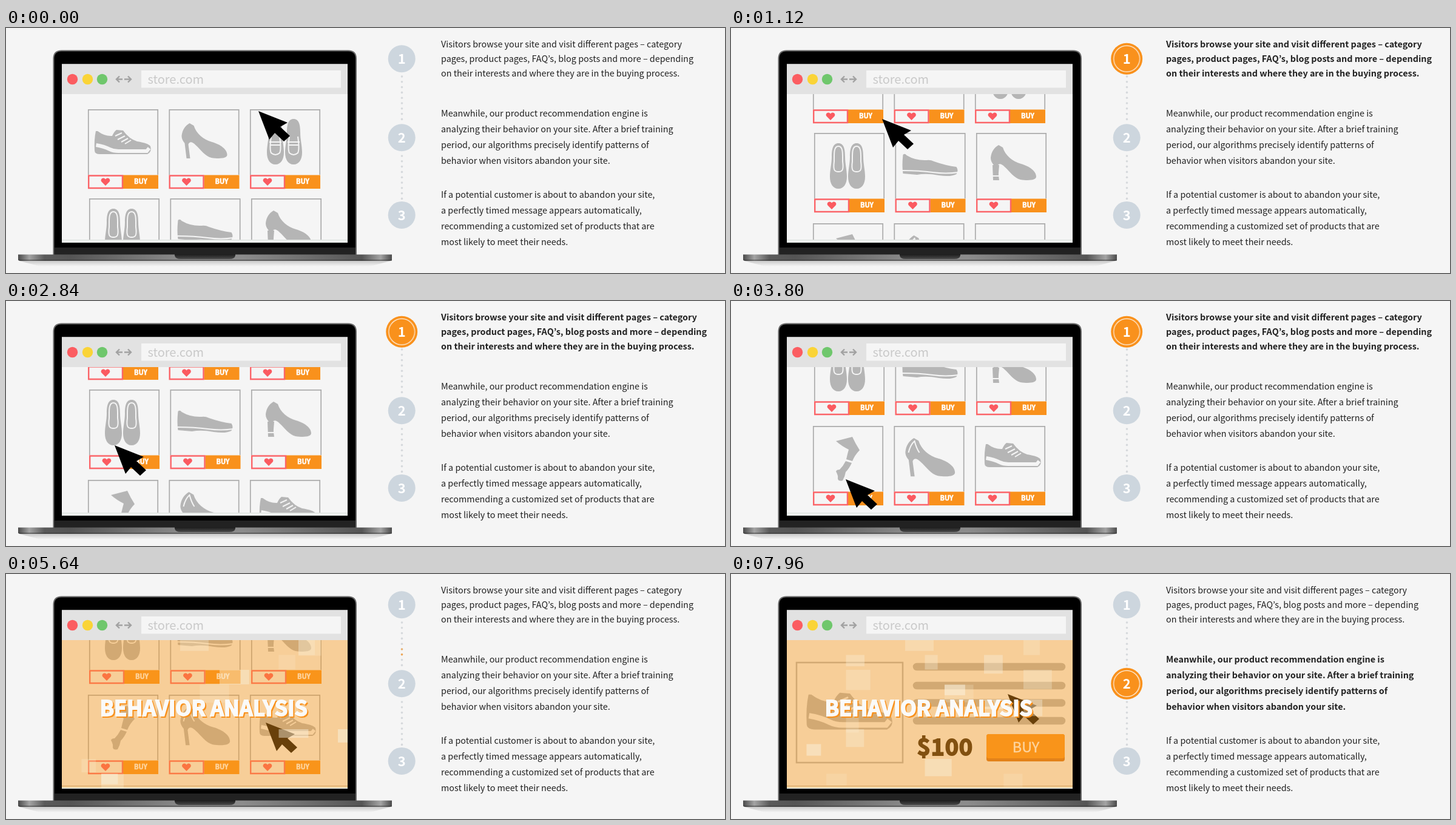
Animation of 1185 by 404 pixels, one loop 8000 ms. Source, as an HTML page:

```html
<!DOCTYPE html>
<html lang="en">
<head>
<meta charset="utf-8">
<title>Behavior analysis</title>
<style>
html, body { margin: 0; width: 100%; height: 100%; overflow: hidden; background: #f5f5f5; }
svg { display: block; width: 1185px; height: 404px; }
text { font-family: "Noto Sans CJK KR", "Noto Sans CJK JP", "Noto Sans CJK SC", "Noto Sans CJK", "Noto Sans", sans-serif; white-space: pre; }
.copy { font-size: 14.37px; fill: #222; }
.bold { font-weight: 700; }
.mid { text-anchor: middle; }
.cut { fill: none; stroke: #f5f5f5; stroke-width: 2; }
.sole { stroke-width: 6; }

.scroll, .cursor, .grid, .detail, .overlay, .anim { animation: 8s linear infinite; }
.scroll { animation-name: scroll; }
.cursor { animation-name: cursor; animation-timing-function: ease-in-out; }
.grid { animation-name: leave; }
.detail { animation-name: enter; }
.overlay { animation-name: overlay; }
.disc { transform-box: fill-box; transform-origin: center; }
.ring { fill: none; stroke: #fff; stroke-width: 1.1; stroke-dasharray: 100 100; }
.plain1 { animation-name: plain1; }
.bold1 { animation-name: bold1; }
.plain2 { animation-name: plain2; }
.bold2 { animation-name: bold2; }
.disc1 { animation-name: disc1; }
.disc2 { animation-name: disc2; }
.ring1 { animation-name: ring1; }
.ring2 { animation-name: ring2; }
.pulse { opacity: 0; animation-name: pulse; }
.block { opacity: 0; animation: blink infinite; }

@keyframes scroll {
  0% { transform: translateY(0); animation-timing-function: ease-in-out; }
  14%, 27.5% { transform: translateY(-108px); animation-timing-function: ease-in; }
  35.5% { transform: translateY(-135px); }
  47.5% { transform: translateY(-224px); animation-timing-function: ease-out; }
  50%, 100% { transform: translateY(-231px); }
}
@keyframes cursor {
  0% { transform: translate(416px, 137px); }
  14%, 18% { transform: translate(249px, 150px); }
  35.5% { transform: translate(179px, 238px); }
  47.5%, 49.5% { transform: translate(189px, 294px); }
  64%, 74% { transform: translate(428px, 245px); }
  87.5% { transform: translate(446px, 242px); }
  99.5%, 100% { transform: translate(456px, 198px); }
}
@keyframes leave { 0%, 77.9% { opacity: 1; } 78%, 100% { opacity: 0; } }
@keyframes enter { 0%, 77.9% { opacity: 0; } 78%, 100% { opacity: 1; } }
@keyframes overlay { 0%, 49.5% { opacity: 0; } 55%, 100% { opacity: 1; } }
@keyframes plain1 { 0%, 1.2% { opacity: 1; } 1.25%, 62.4% { opacity: 0; } 62.5%, 100% { opacity: 1; } }
@keyframes bold1 { 0%, 1.2% { opacity: 0; } 1.25%, 62.4% { opacity: 1; } 62.5%, 100% { opacity: 0; } }
@keyframes plain2 { 0%, 76.4% { opacity: 1; } 76.5%, 100% { opacity: 0; } }
@keyframes bold2 { 0%, 76.4% { opacity: 0; } 76.5%, 100% { opacity: 1; } }
@keyframes disc1 {
  0%, .4% { opacity: 0; transform: scale(.85); }
  2.5%, 62% { opacity: 1; transform: none; }
  64.5%, 100% { opacity: 0; transform: scale(.85); }
}
@keyframes disc2 {
  0%, 75.8% { opacity: 0; transform: scale(.85); }
  78%, 100% { opacity: 1; transform: none; }
}
@keyframes ring1 {
  0%, 1.4% { stroke-dashoffset: 100; transform: rotate(-90deg); }
  13.8%, 50.9% { stroke-dashoffset: 0; transform: rotate(-90deg); }
  51% { stroke-dashoffset: 0; transform: none; }
  62%, 100% { stroke-dashoffset: -100; transform: none; }
}
@keyframes ring2 {
  0%, 77.5% { stroke-dashoffset: 100; transform: rotate(-90deg); }
  90.5%, 100% { stroke-dashoffset: 0; transform: rotate(-90deg); }
}
@keyframes pulse { 0% { opacity: 0; } 1.1% { opacity: 1; } 2.6%, 100% { opacity: 0; } }
@keyframes blink { 0%, 30% { opacity: 1; } 30.1%, 100% { opacity: 0; } }
</style>
</head>
<body>
<svg viewBox="0 0 1185 404">
  <defs>
    <linearGradient id="metal">
      <stop offset="0" stop-color="#4a4a4a"/><stop offset=".03" stop-color="#a4a4a4"/>
      <stop offset=".07" stop-color="#5a5a5a"/><stop offset=".14" stop-color="#555"/>
      <stop offset=".45" stop-color="#8c8c8c"/><stop offset=".6" stop-color="#8c8c8c"/>
      <stop offset=".92" stop-color="#555"/><stop offset=".97" stop-color="#a4a4a4"/>
      <stop offset="1" stop-color="#4a4a4a"/>
    </linearGradient>
    <linearGradient id="shade" x2="0" y2="1">
      <stop offset="0" stop-color="#c8c8c8"/><stop offset="1" stop-color="#f5f5f5"/>
    </linearGradient>
    <linearGradient id="notch" x2="0" y2="1">
      <stop offset="0" stop-color="#1c1c1c"/><stop offset="1" stop-color="#4a4a4a"/>
    </linearGradient>
    <clipPath id="page"><path d="M92 109H563V349H92Z"/></clipPath>
    <clipPath id="screen"><path d="M92 109H563V354H92Z"/></clipPath>

    <g id="sneaker">
      <path d="M13 36L16 36Q28 45 40 44Q43 37 47 34L58 35Q68 49 81 53Q100 56 103 61Q106 70 98 74H20Q11 74 11 68Q10 50 13 36Z"/>
      <path class="cut sole" d="M13.500 59Q26 61 36 66Q42 69 50 69H97L101 64"/>
      <path class="cut" d="M45 44L56 39M49 50L61 44M55 54L66 48M61 57L71 51"/>
    </g>
    <g id="heel">
      <path d="M21 44C22 34 27 27 34 23L41 27C45 40 57 50 71 54C85 58 96 66 96 75C96 81 84 82 70 80C60 78 52 66 44 59C38 53 34 53 32 58L35 81H29L26 56C23 52 21 49 21 44Z"/>
    </g>
    <g id="block-heel">
      <use href="#heel" transform="translate(3 -3)"/>
      <path d="M27 53H38L36 78H28Z"/>
      <path class="cut" d="M27 71H38"/>
    </g>
    <g id="open-heel">
      <use href="#heel" transform="translate(-4 -5) scale(1.09)"/>
      <path class="cut" d="M24 44Q27 31 34 25Q37 37 42 44"/>
    </g>
    <path id="footprint" d="M14 0C23 0 25 10 25 22C25 34 28 44 28 55C28 67 23 75 14 75C5 75 0 67 0 55C0 44 3 34 3 22C3 10 5 0 14 0Z"/>
    <g id="moccasins">
      <g id="moccasin" transform="translate(28 16)">
        <use href="#footprint"/>
        <path class="cut" d="M7 29Q4 50 7 56Q14 62 21 56Q24 50 21 29M4 38H24M5 43H23"/>
      </g>
      <use href="#moccasin" x="30"/>
    </g>
    <g id="flats">
      <g id="flat" transform="translate(26 17)">
        <use href="#footprint"/>
        <path class="cut" d="M14 5C22 5 21 18 21 30C23 45 20 47 14 47C8 47 5 45 7 30C7 18 6 5 14 5Z"/>
      </g>
      <use href="#flat" x="30"/>
    </g>
    <g id="ballet">
      <path d="M13 36Q16 33 19 37Q34 46 52 45Q58 44 64 47Q84 54 101 56Q105 62 101 68Q92 73 72 70Q52 66 36 69L13 67Q11 54 13 36Z"/>
      <path class="cut" d="M12 62Q40 62 62 65T104 65"/>
    </g>
    <g id="leg">
      <path d="M38 25L65 18Q70 29 77 40Q69 48 65 58L55 55Q57 46 59 39Q47 33 38 25Z"/>
      <path d="M54 58L64 61Q60 70 54 76Q53 83 49 90Q42 92 41 87Q42 82 38 75Q39 72 44 72Q50 66 54 58Z"/>
    </g>
    <g id="card">
      <path d="M.8 108V.8H115.2V108" fill="none" stroke="#ababab" stroke-width="1.700"/>
      <path d="M58 108.500H116V131H58Z" fill="#f9911c"/>
      <path d="M1.200 109.500H57V130H1.200Z" fill="#f5f5f5" stroke="#fb6468" stroke-width="2.400"/>
      <path d="M29 126L22.500 119.500C19.500 116 25 110.500 29 115.500C33 110.500 38.500 116 35.500 119.500Z" fill="#fb5a60"/>
      <text class="bold mid" x="87" y="123.500" font-size="11" fill="#fff" stroke="#fff" stroke-width=".5">BUY</text>
    </g>
  </defs>

  <rect width="1185" height="404" fill="#f5f5f5"/>
  <path d="M22 384H634L600 393H56Z" fill="url(#shade)"/>
  <path d="M78.500 375V50.500Q78.500 37.500 91.500 37.500H564Q577 37.500 577 50.500V375Z" fill="#000" stroke="#6a6a6a" stroke-width="2"/>
  <path d="M80 362H576V374H80Z" fill="#222"/>
  <path d="M20 373.500H636V382Q636 384 630 384H26Q20 384 20 382Z" fill="url(#metal)"/>
  <path d="M20 382H636V384H22Z" fill="#333" opacity=".5"/>
  <path d="M278 373H378V375Q377 381 368 381H288Q279 381 278 375Z" fill="url(#notch)"/>

  <path d="M92 59.500H563V354H92Z" fill="#f5f5f5"/>
  <path d="M92 59.500H563V109H92Z" fill="#e2e2e2"/>
  <circle cx="109.500" cy="84.500" r="8.700" fill="#fb5d61"/>
  <circle cx="134.500" cy="84.500" r="8.700" fill="#fad437"/>
  <circle cx="158.500" cy="84.500" r="8.700" fill="#6fc76c"/>
  <path d="M192 84.500H182M187 79.500L182 84.500L187 89.500M195 84.500H206M201 79.500L206 84.500L201 89.500" fill="none" stroke="#a2a2a2" stroke-width="2.400"/>
  <path d="M223 70H552V98.500H223Z" fill="#f5f5f5"/>
  <text x="233.500" y="92" font-size="20" fill="#c9c9c9">store.com</text>

  <g clip-path="url(#page)">
    <g class="grid"><g class="scroll" id="cards" fill="#b5b5b5"></g></g>
    <g class="detail" fill="#b5b5b5">
      <path d="M108 146H283V311H108Z" fill="none" stroke="#b5b5b5" stroke-width="2.500"/>
      <use href="#sneaker" transform="translate(108 144) scale(1.52)"/>
      <path d="M306 153H545M306 184H545M306 212.500H545M306 242H545" stroke="#b5b5b5" stroke-width="12.500" stroke-linecap="round"/>
      <text class="bold" x="306.500" y="299" font-size="38" letter-spacing=".7" fill="#2b1d0c" stroke="#2b1d0c" stroke-width="1.800">$100</text>
      <rect x="421" y="264" width="129" height="45" rx="4" fill="#d0701a"/>
      <rect x="421" y="264" width="129" height="40" rx="4" fill="#f9911c"/>
      <text class="mid" x="486" y="294" font-size="23.500" fill="#fff" stroke="#fff" stroke-width=".4">BUY</text>
    </g>
  </g>
  <path d="M92 349.500H563" stroke="#dfe3e0"/>
  <path d="M92 350H563V354H92Z" fill="#eef3ef"/>

  <path class="cursor" d="M0 0L48 19L36 26L52 41L42 50L27 36L18 47Z"/>

  <g class="overlay">
    <g clip-path="url(#screen)">
      <path d="M92 109H563V352.500H92Z" fill="#f99a1a" opacity=".42"/>
      <path d="M92 349.500H563" stroke="#dba765"/>
      <g id="mosaic" fill="#f8f0dc"></g>
    </g>
    <g class="bold" font-size="34.400" stroke-width="1.800">
      <text x="156.700" y="236" fill="#f9911c" stroke="#f9911c">BEHAVIOR ANALYSIS</text>
      <text x="154.700" y="234" fill="#fafafa" stroke="#fafafa">BEHAVIOR ANALYSIS</text>
    </g>
  </g>

  <g id="steps"></g>
</svg>
<script>
const fill = (id, parts) => { document.getElementById(id).innerHTML = parts.join(""); };

const rows = [
  { y: 134, x: 135, items: ["sneaker", "heel", "moccasins"] },
  { y: 281, x: 137, items: ["flats", "ballet", "block-heel"] },
  { y: 430, x: 135, items: ["leg", "open-heel", "sneaker"] },
];
fill("cards", rows.flatMap(({ x, y, items }, row) => items.map((item, col) => {
  const nudge = row === 2 && item === "sneaker" ? 'transform="translate(5 -6)"' : "";
  return `<g transform="translate(${x + col * 133.5} ${y})"><use href="#card"/><use href="#${item}" ${nudge}/></g>`;
})));

// Flickering pale tiles over the page, from a seeded generator
let seed = 29;
const random = () => (seed = seed * 16807 % 2147483647) / 2147483647;
fill("mosaic", Array.from({ length: 44 }, () => {
  const x = 92 + Math.floor(random() * 15) * 32.5;
  const y = 109 + Math.floor(random() * 10) * 24.5;
  const width = 20 + random() * 30, height = 12 + random() * 24;
  const period = [1, 1.6, 2][Math.floor(random() * 3)];
  return `<rect class="block" x="${x}" y="${y}" width="${width}" height="${height}"
    fill-opacity="${0.15 + random() * 0.4}"
    style="animation-duration:${period}s;animation-delay:${-random() * period}s"/>`;
}));

const steps = [
  { y: 50.7, base: 31.5, lead: 24, lines: [
    "Visitors browse your site and visit different pages – category",
    "pages, product pages, FAQ’s, blog posts and more – depending",
    "on their interests and where they are in the buying process."] },
  { y: 180.8, base: 146, lead: 26, lines: [
    "Meanwhile, our product recommendation engine is",
    "analyzing their behavior on your site. After a brief training",
    "period, our algorithms precisely identify patterns of",
    "behavior when visitors abandon your site."] },
  { y: 308.4, base: 280, lead: 26, lines: [
    "If a potential customer is about to abandon your site,",
    "a perfectly timed message appears automatically,",
    "recommending a customized set of products that are",
    "most likely to meet their needs."] },
];

const dots = (top, lit) => Array.from({ length: 9 }, (_, i) => {
  const dot = attrs => `<circle cx="652.500" cy="${top + i * 8.8}" r="1.800" ${attrs}/>`;
  return dot('fill="#d6d9dc"') +
    (lit ? dot(`class="anim pulse" fill="#f9911c" style="animation-delay:${5.1 + i * 0.08}s"`) : "");
}).join("");

fill("steps", steps.map(({ y, base, lead, lines }, i) => {
  const n = i + 1;
  const copy = cls => `<g class="copy ${cls}">` +
    lines.map((line, k) => `<text x="717" y="${base + k * lead}">${line}</text>`).join("") + "</g>";
  const active = n < 3 ? `<circle class="anim disc disc${n}" cx="652.200" cy="${y}" r="26" fill="#f9911c"/>
    <circle class="anim disc ring ring${n}" cx="652.200" cy="${y}" r="21.500" pathLength="100"/>` : "";
  return `<circle cx="652.200" cy="${y}" r="22.500" fill="#cdd6de"/>${active}
    <text class="bold mid" x="652.200" y="${y + 8.5}" font-size="22" fill="#fff">${n}</text>` +
    (n < 3 ? copy(`anim plain${n}`) + copy(`bold anim bold${n}`) : copy(""));
}).concat(dots(80, true), dots(211, false)));
</script>
</body>
</html>
```
